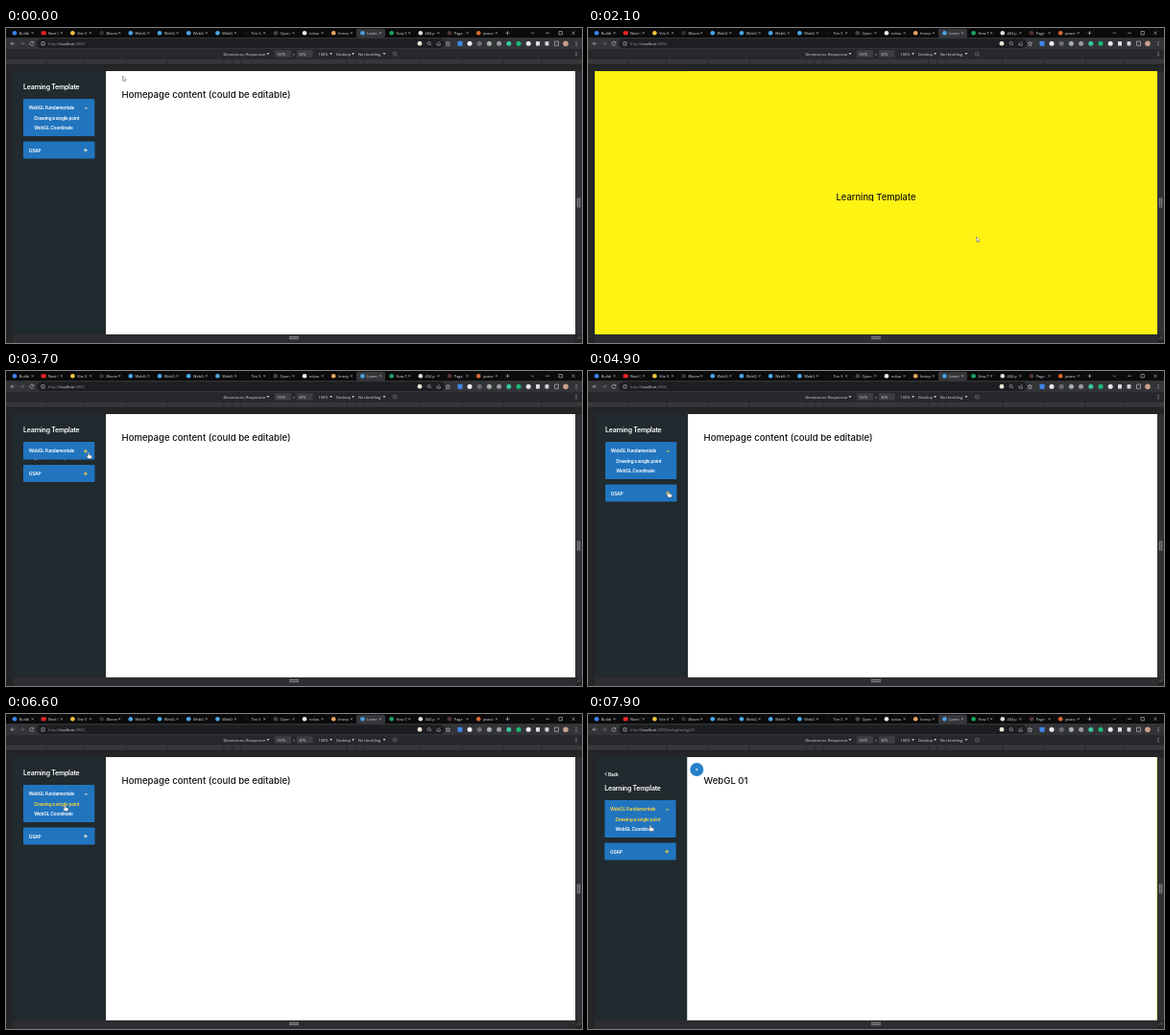
These frames come from a looping animation (600x329 px, 8000 ms). An HTML page:

```html
<!DOCTYPE html>
<html lang="en">
<head>
<meta charset="utf-8">
<title>Learning Template</title>
<style>
  html, body { margin: 0; width: 100%; height: 100%; overflow: hidden; background: #242527; }
  svg { display: block; width: 100vw; height: 100vh; }
  text { font: 500 3.9px "Open Sans", "Noto Sans", sans-serif; fill: #dcdde0; white-space: pre; }
  .app text { font: 600 4.9px Inter, sans-serif; letter-spacing: -.25px; fill: #fff; }
  .app .title { font-size: 6.9px; letter-spacing: -.2px; }
  .app .head { font-size: 9.6px; font-weight: 500; letter-spacing: 0; fill: #111; }
  .app .intro { font-size: 9.35px; font-weight: 500; letter-spacing: 0; fill: #16160a; text-anchor: middle; }
</style>
</head>
<body>
<svg viewBox="0 0 600 329" preserveAspectRatio="none">
  <defs>
    <clipPath id="pageClip"><rect x="7" y="45" width="586" height="275"/></clipPath>
    <clipPath id="introClip"><rect x="200" y="168" width="200" height="13"/></clipPath>
    <clipPath id="cardClip"><rect id="cardMask" x="18" y="74" width="74.5" height="39" rx="1"/></clipPath>
  </defs>
  <g id="chrome"></g>

  <g class="app" clip-path="url(#pageClip)">
    <rect x="7" y="45" width="586" height="275" fill="#fff"/>
    <text id="head" class="head" x="120.5" y="72.6"></text>
    <g id="side">
      <rect x="7" y="45" width="97" height="275" fill="#212a2e"/>
      <g id="back">
        <path d="M20.3 61l-1.7 1.8 1.7 1.8" fill="none" stroke="#fff" stroke-width=".8"/>
        <text x="21.7" y="64.6">Back</text>
      </g>
      <g id="menu">
        <text class="title" x="18" y="63.8">Learning Template</text>
        <g clip-path="url(#cardClip)">
          <rect x="18" y="74" width="74.5" height="39" fill="#2175bf"/>
          <text id="topic" x="23.8" y="85.4">WebGL Fundamentals</text>
          <text id="lesson" x="29.3" y="96.4">Drawing a single point</text>
          <text x="29.3" y="105.9">WebGL Coordinate</text>
          <path id="icon1" stroke-width=".9"/>
        </g>
        <g id="card2">
          <rect x="18" y="98" width="74.5" height="18" rx="1" fill="#2175bf"/>
          <text x="23.8" y="109">GSAP</text>
          <path id="icon2" stroke-width=".9"/>
        </g>
      </g>
    </g>
    <g id="close">
      <circle cx="113.3" cy="58" r="7" fill="#2581ca"/>
      <path d="M112.2 56.9l2.2 2.2m0-2.2l-2.2 2.2" stroke="#fff" stroke-width=".8"/>
    </g>
    <g id="intro">
      <rect x="7" y="45" width="586" height="275" fill="#fff314"/>
      <g clip-path="url(#introClip)"><text id="introText" class="intro" x="300" y="178.6">Learning Template</text></g>
    </g>
    <rect id="wipe" y="45" height="275" fill="#f5d822"/>
  </g>

  <g id="cursor">
    <path id="arrow" d="M0 0v5.2l1.2-1 .9 1.9.9-.4-.8-1.8h1.6z" fill="#fff" stroke="#555" stroke-width=".5"/>
    <path id="hand" d="M-.7.5Q0-.5.7.5V2.6L3 3.2Q3.7 3.5 3.5 4.6L3 6.5H-.3L-2.2 4Q-2 3-.7 3.8z" fill="#fff" stroke="#333" stroke-width=".4"/>
  </g>
</svg>
<script>
const $ = id => document.getElementById(id);
const rect = (x, y, w, h, fill, r = 0) => `<rect x="${x}" y="${y}" width="${w}" height="${h}" rx="${r}" fill="${fill}"/>`;
const dot = (x, y, r, fill) => `<circle cx="${x}" cy="${y}" r="${r}" fill="${fill}"/>`;
const line = (d, color = '#c8c9cc', w = .6) => `<path d="${d}" fill="none" stroke="${color}" stroke-width="${w}"/>`;
const label = (x, y, s, fill = '#dcdde0') => `<text x="${x}" y="${y}" style="fill:${fill}">${s}</text>`;
const cross = (x, y, r, color) => line(`M${x - r} ${y - r}l${2 * r} ${2 * r}m0 ${-2 * r}l${-2 * r} ${2 * r}`, color, .5);

function buildChrome() {
  const tabs = [
    ['Buildi', '#3a86ff'], ['Next (', '#e22'], ['Vite V', '#f3c53c'], ['Bloom', '#333'],
    ['WebG', '#4aa8e8'], ['WebG', '#4aa8e8'], ['WebG', '#4aa8e8'], ['WebG', '#4aa8e8'],
    ['Tim S', '#111'], ['Open', '#444'], ['nolaa', '#eee'], ['Interp', '#e8a35c'],
    ['Learn', '#4aa0e0'], ['How T', '#15a862'], ['404 p', '#ddd'], ['Page', '#533'], ['javasc', '#d9682e']
  ];
  let s = rect(0, 0, 600, 10, '#0b0b0c') + rect(365, .8, 30, 9.2, '#35363a', 1.5);
  tabs.forEach(([name, color], i) => {
    const x = 9 + 30.2 * i;
    s += (i === 1 ? rect(x - 2.5, 3.2, 5, 4, color, 1) : dot(x, 5.2, 2.3, color));
    s += label(x + 4.8, 6.6, name) + cross(x + 18.6, 5.2, 1, '#c8c9cc');
  });
  s += line('M520.5 5.2h4m-2-2v4') + line('M547 4.5l1.5 1.5 1.5-1.5') + line('M562 5.2h4') +
       line('M576 3.5h3.4v3.4h-3.4z') + cross(591, 5.2, 1.6, '#ddd');

  // toolbar
  s += rect(0, 10, 600, 12, '#333438') + rect(32, 11.3, 425, 9.8, '#1d1e21', 4.9);
  s += line('M9 16.2h-4m1.7-1.7l-1.7 1.7 1.7 1.7') + line('M15 16.2h4m-1.7-1.7l1.7 1.7-1.7 1.7', '#77787c') +
       line('M28.6 15.2a2 2 0 1 0 .2 1.6m0-2.6v1.3h-1.4') + line('M37 14.7h3v3.2h-3z');
  s += `<text x="44" y="17.7" style="fill:#8f9196">http://<tspan fill="#e4e5e8">localhost</tspan>:3000<tspan id="path"></tspan></text>`;
  s += dot(431, 16.2, 2.4, '#e9e2d5') + line('M443 18l-1.2-1.2a1.5 1.5 0 1 0-.3.3') +
       line('M449 15.5v2.5h3.2v-2m-2-.2l2-1.5') + line('M460.4 14l.7 1.5 1.6.2-1.2 1.1.3 1.7-1.4-.8-1.4.8.3-1.7-1.2-1.1 1.6-.2z');
  s += rect(470.5, 13.7, 5, 5, '#3f87e8', .6);
  ['#eee', '#6b6e70', '#a9b0aa', '#999b9e', '#39c6a4', '#1dba78', '#e8e8e8'].forEach((c, i) => s += dot(483 + 10.2 * i, 16.2, 2.5, c));
  s += rect(552, 14, 4, 4.4, '#ddd', .5) + rect(561.5, 14, 4, 4.4, '#d0d1d4', 1) +
       line('M571.5 14h4v4.4h-4z') + dot(583, 16.2, 2.8, '#c9a08c');

  // device bar
  s += rect(0, 22, 600, 10, '#27282b');
  s += rect(280, 23.2, 17, 7.4, '#3d3e42') + rect(303, 23.2, 16.5, 7.4, '#3d3e42');
  s += label(226.5, 28.5, 'Dimensions: Responsive') + label(282, 28.5, '1975') + label(298.7, 28.5, '×') +
       label(305.5, 28.5, '875') + label(325.5, 28.5, '100%') + label(344, 28.5, 'Desktop') + label(367, 28.5, 'No throttling');
  for (const x of [273, 338.6, 361.6, 394]) s += `<path d="M${x - 1.3} 26h2.6l-1.3 2z" fill="#ddd"/>`;
  s += line('M407.2 27a2 2 0 1 0-4 0 2 2 0 1 0 4 0m-3.4-1.4l2.8 2.8', '#77787c');
  for (const y of [16.2, 27]) for (const d of [-1.8, 0, 1.8]) s += dot(594, y + d, .5, '#d0d1d4');

  // ruler and frame handles
  s += rect(0, 32, 600, 6, '#36373a') + line('M0 32h600M0 38h600', '#1b1c1e');
  for (const d of [55, 64, 73, 132, 175, 218, 258]) s += line(`M${300 - d} 32v6M${300 + d} 32v6`, '#232426', .7);
  s += rect(593, 45, 7, 275, '#303134') + rect(7, 320, 586, 9, '#2c2d30');
  s += rect(594.7, 177.5, 3.6, 10, '#77787c') + line('M596.5 178v9', '#333', .6);
  s += rect(295, 321.8, 10, 3.4, '#77787c') + line('M295.5 323.5h9', '#333', .6);
  s += line('M594.5 325l4-4m-1.7 4l1.7-1.7', '#88898c');
  $('chrome').innerHTML = s;
}

const clamp = v => Math.max(0, Math.min(1, v));
const part = (t, a, b) => clamp((t - a) / (b - a));
const inOut = p => p < .5 ? 4 * p ** 3 : 1 - 4 * (1 - p) ** 3;
const out = p => 1 - (1 - p) ** 3;

const pointer = [
  [0, 121.5, 50], [100, 121.5, 50], [400, 83, 125], [500, 83, 125], [600, 235, 207], [800, 235, 207],
  [1700, 404.5, 218], [2400, 404.5, 218], [3400, 86, 85], [4250, 86, 85], [4700, 84, 125.5],
  [5100, 84, 125.5], [5650, 86, 84], [5950, 86, 84], [6500, 61.5, 95], [6650, 61.5, 95],
  [7100, 103, 102.5], [7300, 103, 102.5], [7850, 65, 116], [8000, 65, 116]
];
function pointerAt(t) {
  const i = pointer.findIndex(k => k[0] > t);
  const [a, x, y] = pointer[i - 1], [b, u, v] = pointer[i];
  const p = part(t, a, b), e = p * p * (3 - 2 * p);
  return [x + (u - x) * e, y + (v - y) * e];
}

const show = (id, on) => $(id).setAttribute('visibility', on ? 'visible' : 'hidden');
const move = (id, x, y) => $(id).setAttribute('transform', `translate(${x} ${y})`);
function setIcon(id, y, open, color) {
  $(id).setAttribute('d', open ? `M81.9 ${y}h3` : `M80.9 ${y}h4m-2-2v4`);
  $(id).setAttribute('stroke', color);
}

function draw(t) {
  const lessonPage = t >= 7300;
  const open = t < 900 ? 1
    : inOut(part(t, 3800, 4200)) - inOut(part(t, 5050, 5450)) + inOut(part(t, 5850, 6250));

  // sidebar and accordion
  move('side', lessonPage ? -97 * (1 - out(part(t, 7500, 8000))) : -97 * inOut(part(t, 6650, 7080)), 0);
  move('menu', 0, lessonPage ? 16 : 0);
  show('back', lessonPage);
  $('cardMask').setAttribute('height', 18.5 + 20.5 * open);
  move('card2', 0, 20.5 * open);
  const iconColor = t < 900 || (t > 6300 && !lessonPage) ? '#f3ecd0' : '#ffd43a';
  setIcon('icon1', 83.8, open > .5, iconColor);
  setIcon('icon2', 107.2, t > 5050 && t < 5850, iconColor);
  $('topic').style.fill = lessonPage ? '#ffd43a' : '#fff';
  $('lesson').style.fill = t > 6400 ? '#ffd43a' : '#fff';

  // main content
  $('head').textContent = lessonPage ? 'WebGL 01' : 'Homepage content (could be editable)';
  $('head').style.opacity = lessonPage ? part(t, 7450, 7550) : 1 - part(t, 6650, 6950);
  show('close', t >= 7500);
  $('path').textContent = lessonPage ? '/webgl/webgl-01' : '';

  // loading screen
  show('intro', t >= 900 && t < 2800);
  move('intro', 0, 275 * inOut(part(t, 2080, 2780)));
  move('introText', 0, 14 * (1 - out(part(t, 1100, 1600))) + 14 * part(t, 1900, 2300) ** 3);

  // page transition
  const left = 7 + 586 * inOut(part(t, 7450, 7930)), right = 7 + 586 * inOut(part(t, 7200, 7500));
  $('wipe').setAttribute('x', left);
  $('wipe').setAttribute('width', Math.max(0, right - left));

  const hand = (t > 300 && t < 550) || (t > 3250 && t < 6750) || t > 7750;
  move('cursor', ...pointerAt(t));
  show('hand', hand);
  show('arrow', !hand);
}

buildChrome();
const start = performance.now();
function tick() {
  draw((performance.now() - start) % 8000);
  requestAnimationFrame(tick);
}
tick();
</script>
</body>
</html>
```
